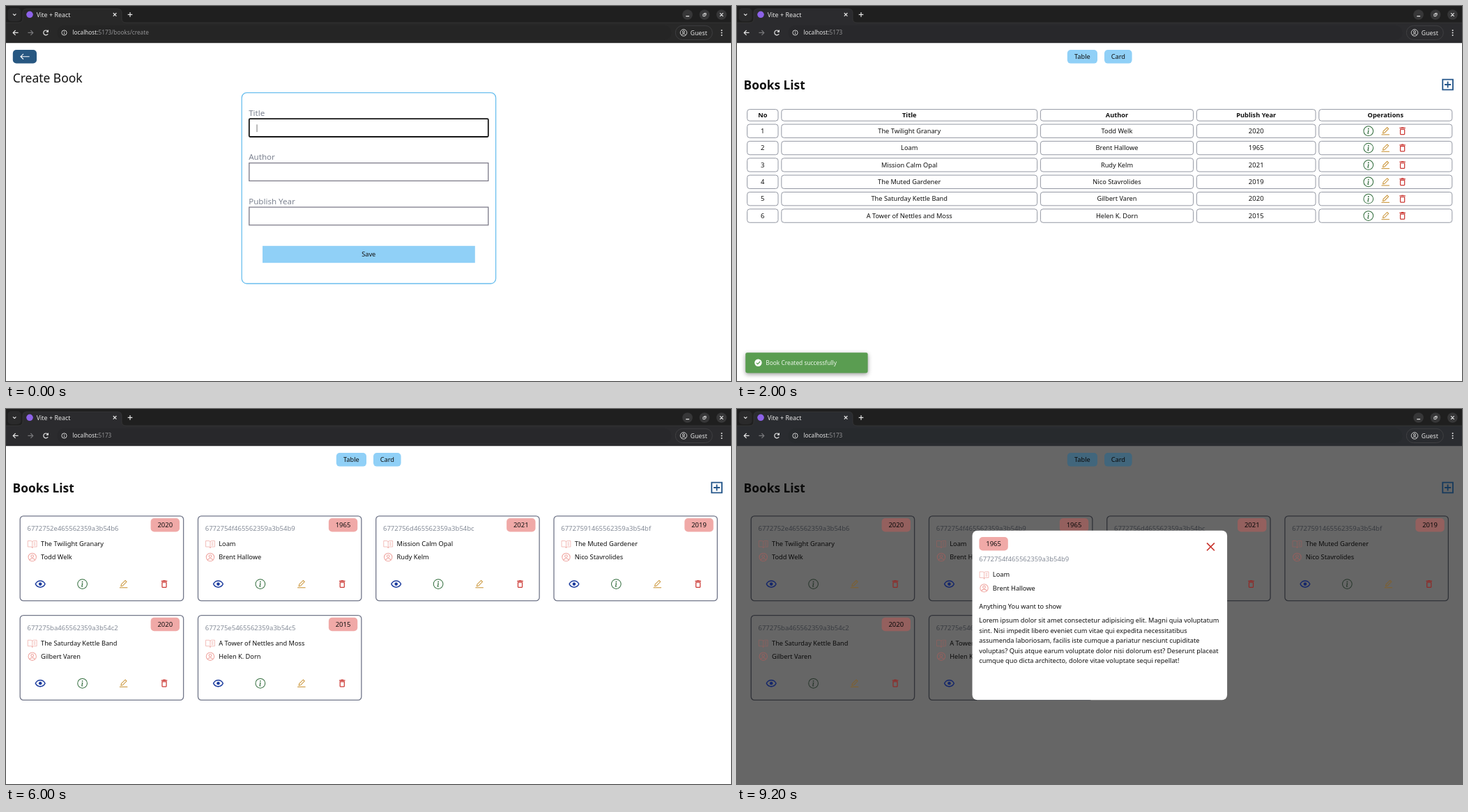
These frames come from a looping animation (1040x539 px, 10 s). An HTML page with a canvas:

```html
<!DOCTYPE html>
<html lang="en">
<head>
<meta charset="utf-8">
<title>Vite + React</title>
<style>
html, body { margin: 0; width: 100%; height: 100%; overflow: hidden; background: #fff; }
canvas { display: block; width: 1040px; height: 539px; }
</style>
</head>
<body>
<canvas id="stage"></canvas>
<script>
const W = 1040, H = 539, SCENE_MS = 2000;
const FONT = '"Noto Sans", "Open Sans", sans-serif';
const BODY = 9.24, DIGITS = 9.5, LABEL = 11.55, HEADING = 17.45;
const canvas = document.getElementById('stage');
const ctx = canvas.getContext('2d');
const ratio = window.devicePixelRatio || 1;
canvas.width = W * ratio;
canvas.height = H * ratio;

const light = {
  page: '#fff', ink: '#111', muted: '#858c98', border: '#72778a', button: '#90d0f7',
  badge: '#f0a9a7', pink: '#efa5a0', add: '#24568a', eye: '#1c3c9e',
  info: '#2f6b3a', edit: '#cb963a', bin: '#cc3934'
};
const dim = {
  page: '#666', ink: '#0a0a0a', muted: '#383b40', border: '#303238', button: '#41667c',
  badge: '#94605e', pink: '#94605e', add: '#173a5c', eye: '#15276b',
  info: '#26352a', edit: '#80602c', bin: '#8f2b28'
};
const sky = '#6bbfee', navy = '#275781', label = '#7d8391';

const books = [
  ['The Twilight Granary', 'Todd Welk', '2020', '6772752e465562359a3b54b6'],
  ['Loam', 'Brent Hallowe', '1965', '6772754f465562359a3b54b9'],
  ['Mission Calm Opal', 'Rudy Kelm', '2021', '6772756d465562359a3b54bc'],
  ['The Muted Gardener', 'Nico Stavrolides', '2019', '67727591465562359a3b54bf'],
  ['The Saturday Kettle Band', 'Gilbert Varen', '2020', '677275ba465562359a3b54c2'],
  ['A Tower of Nettles and Moss', 'Helen K. Dorn', '2015', '677275e5465562359a3b54c5']
];

function text(str, x, y, size = BODY, color = '#111', align = 'left', weight = 400) {
  ctx.font = `${weight} ${size}px ${FONT}`;
  ctx.fillStyle = color;
  ctx.textAlign = align;
  ctx.fillText(str, x, y);
}

function box(x, y, w, h, r, fill, stroke, width = 1) {
  ctx.beginPath();
  ctx.roundRect(x, y, w, h, r);
  if (fill) { ctx.fillStyle = fill; ctx.fill(); }
  if (stroke) { ctx.strokeStyle = stroke; ctx.lineWidth = width; ctx.stroke(); }
}

function disc(x, y, r, color) {
  ctx.beginPath();
  ctx.arc(x, y, r, 0, Math.PI * 2);
  ctx.fillStyle = color;
  ctx.fill();
}

function line(d, color, width = 1) {
  ctx.strokeStyle = color;
  ctx.lineWidth = width;
  ctx.stroke(new Path2D(d));
}

// Icons are drawn in a square grid, centred on (x, y).
function icon(x, y, size, grid, parts, color) {
  ctx.save();
  ctx.translate(x - size / 2, y - size / 2);
  ctx.scale(size / grid, size / grid);
  ctx.fillStyle = color;
  for (const [d, width] of parts) {
    if (width) line(d, color, width);
    else ctx.fill(new Path2D(d), 'evenodd');
  }
  ctx.restore();
}

const shapes = {
  info: [16, [
    ['M15.5 8a7.5 7.5 0 1 1-15 0a7.5 7.5 0 0 1 15 0', 1.1],
    ['M8.93 6.6l-2.29.28-.08.38.45.08c.29.07.35.18.29.47l-.74 3.47c-.2.9.1 1.32.8 1.32.55 0 1.18-.25 1.47-.6l.09-.42c-.2.18-.5.25-.69.25-.27 0-.37-.2-.3-.53zM9 4.5a1 1 0 1 1-2 0a1 1 0 0 1 2 0']]],
  edit: [24, [
    ['M6 17l.8-4.4L16.1 3.6l3.1 3.1-9.2 9.4z', 1.7],
    ['M2.6 20.5h18.8', 1.8]]],
  bin: [24, [['M6 19c0 1.1.9 2 2 2h8c1.1 0 2-.9 2-2V7H6zM8 9h8v10H8zM15.5 4l-1-1h-5l-1 1H5v2h14V4z']]],
  eye: [24, [
    ['M15 12a3 3 0 1 1-6 0a3 3 0 0 1 6 0'],
    ['M12 5c-7.6 0-10 7-10 7s2.2 7 10 7c7.6 0 10-7 10-7s-2.3-7-10-7zm0 12c-5.4 0-7.3-3.8-7.9-5C4.7 10.8 6.6 7 12 7s7.3 3.8 7.9 5c-.6 1.2-2.5 5-7.9 5z']]],
  book: [256, [
    ['M128 88a32 32 0 0 1 32-32h76v144h-76a32 32 0 0 0-32 32V88a32 32 0 0 0-32-32H20v144h76a32 32 0 0 1 32 32', 12],
    ['M160 96h44M160 128h44M160 160h44', 12]]],
  user: [24, [
    ['M21.2 12a9.2 9.2 0 1 1-18.4 0a9.2 9.2 0 0 1 18.4 0', 1.7],
    ['M15 9.7a3 3 0 1 1-6 0a3 3 0 0 1 6 0', 1.7],
    ['M6.3 18.6c.6-2.2 2.1-3.4 4.2-3.4h3c2.1 0 3.6 1.2 4.2 3.4', 1.7]]],
  add: [24, [['M4 4h16v16H4zM12 7v10M7 12h10', 2]]]
};

function draw(name, x, y, size, color) {
  icon(x, y, size, ...shapes[name], color);
}

function browser(path, bar, pill) {
  const white = '#e6e6e6';
  ctx.fillStyle = '#1f1f1f';
  ctx.fillRect(0, 0, W, 24);
  ctx.fillStyle = bar;
  ctx.fillRect(0, 24, W, 29.2);
  ctx.fill(new Path2D('M18 24q6 0 6-6V10q0-6 6-6H160q6 0 6 6v8q0 6 6 6z'));
  line('M0 24H18q6 0 6-6V10q0-6 6-6H160q6 0 6 6v8q0 6 6 6H1040', '#3b3b3c', 0.7);
  box(2.5, 3, 19, 19, 5, '#2a2a2b');
  line('M10 11.3l2.2 2.2 2.2-2.2', white, 1.2);
  disc(34, 12.3, 4.8, '#8d62e8');
  text('Vite + React', 43.7, 15.7, 8.95, white);
  line('M153.8 10l4.6 4.6M158.4 10l-4.6 4.6', white, 1.2);
  line('M174.7 12.4h6.6M178 9.1v6.6', white, 1.2);

  for (const x of [977.6, 1002, 1026.4]) disc(x, 12.5, 7.3, '#373738');
  line('M975.3 14.6h4.8M1024.1 10.2l4.6 4.6M1028.7 10.2l-4.6 4.6', white, 1.1);
  line('M999.9 11.6h3v3h-3zM1001.2 10.4h3v3', white, 0.9);

  line('M17.6 38.4H10.2M13.6 35l-3.4 3.4 3.4 3.4', white, 1.2);
  line('M31.4 38.4H38.8M35.4 35l3.4 3.4-3.4 3.4', '#77777a', 1.2);
  line('M60.2 40a3.4 3.4 0 1 1-.5-3.9M60.4 34.6v2.6h-2.6', white, 1.2);
  box(73.5, 27.8, 881, 21.2, 10.6, pill);
  line('M87.1 38.4a3.6 3.6 0 1 1-7.2 0a3.6 3.6 0 0 1 7.2 0M83.5 37.9v2.5M83.5 36.1v1', white, 0.9);
  text('localhost:', 95.5, 41.4, 8.23, white);
  text('5173' + path, 132.5, 41.4, 8.23, '#929294');
  box(960.3, 28.3, 53, 20.2, 10.1, null, '#454547', 0.8);
  draw('user', 972, 38.4, 12.4, white);
  text('Guest', 981.8, 41.5, 8.73, white);
  for (const y of [34.9, 38.4, 41.9]) disc(1026.6, y, 1, white);
}

function backHeader(title) {
  box(9.8, 63, 34.2, 19.5, 5, navy);
  line('M33.6 72.7H21M25 68.9l-4 3.8 4 3.8', '#fff', 1.1);
  text(title, 9.7, 109.8, HEADING);
}

function button(str, x, w, color, ink) {
  box(x, 63, w, 19.6, 5, color);
  text(str, x + w / 2, 76, BODY, ink, 'center');
}

function listHeader(c) {
  button('Table', 473.8, 43.2, c.button, c.ink);
  button('Card', 527, 39.6, c.button, c.ink);
  text('Books List', 9.5, 119.5, 17.35, c.ink, 'left', 700);
  draw('add', 1019.6, 113, 22, c.add);
}

function badge(year, x, y, c) {
  box(x, y, 41.4, 19.5, 5, c.badge);
  text(year, x + 20.7, y + 13, DIGITS, c.ink, 'center');
}

function bookLines(title, author, x, y, c) {
  draw('book', x, y, 15.2, c.pink);
  draw('user', x, y + 19.2, 14.8, c.pink);
  text(title, x + 12.3, y + 3, BODY, c.ink);
  text(author, x + 12.3, y + 22.5, BODY, c.ink);
}

function createPage() {
  browser('/books/create', '#282828', '#252525');
  backHeader('Create Book');
  box(338.2, 124.7, 364.4, 274.3, 7.2, null, sky, 1.3);
  ['Title', 'Author', 'Publish Year'].forEach((name, i) => {
    const y = 162.2 + i * 63.5;
    text(name, 348.2, y - 4.6, LABEL, label);
    if (i) box(348.8, y, 343, 25.6, 0, null, '#7b7987', 1.3);
    else box(348.8, y, 343, 25.8, 1.4, null, '#151515', 1.8);
  });
  line('M360 170.3v10.8', '#777', 1);
  ctx.fillStyle = light.button;
  ctx.fillRect(368, 344.8, 304.8, 24.4);
  text('Save', 520.2, 360, BODY, '#111', 'center');
}

function tablePage() {
  browser('', '#2b2b2e', '#28282b');
  listHeader(light);
  const cols = [[14.6, 59], [63.8, 430.6], [435.4, 654.6], [659.4, 830], [834.8, 1025.8]];
  const row = (values, y, h, weight) => cols.forEach(([left, right], i) => {
    box(left, y, right - left, h, 3.6, null, '#888d99', 0.9);
    if (values[i] === undefined) return;
    const size = /^\d/.test(values[i]) ? DIGITS : BODY;
    text(values[i], (left + right) / 2, y + h / 2 + 3.2, size, '#111', 'center', weight);
  });
  row(['No', 'Title', 'Author', 'Publish Year', 'Operations'], 148.6, 16.6, 700);
  books.forEach(([title, author, year], i) => {
    const y = 170 + i * 24.37;
    row([String(i + 1), title, author, year], y, 19.4, 400);
    draw('info', 905.8, y + 9.7, 14.6, light.info);
    draw('edit', 930.2, y + 9.7, 14.6, light.edit);
    draw('bin', 954.6, y + 9.7, 14.6, light.bin);
  });
  toast('Book Created successfully');
}

function toast(message) {
  ctx.save();
  ctx.shadowColor = 'rgba(0,0,0,.4)';
  ctx.shadowBlur = 6 * ratio;
  ctx.shadowOffsetY = 2 * ratio;
  box(12.2, 498.2, 175.4, 29.2, 2.4, '#5a9d51');
  ctx.restore();
  disc(30.4, 512.7, 5.2, '#fff');
  line('M27.8 512.8l1.9 1.9 3.5-3.7', '#5a9d51', 1.2);
  text(message, 41.2, 515.8, 8.37, '#eaf4e7');
}

function detailsPage() {
  const [title, author, year, id] = books[2];
  const stamp = 'Mon Dec 30 2024 15:56:53 GMT+0530 (India Standard Time)';
  browser('/books/details/' + id, '#282828', '#252525');
  backHeader('Show Book');
  box(10.3, 124.7, 388, 240, 7.2, null, sky, 1.3);
  const rows = [
    ['Id', id, 40.7, DIGITS], ['Title', title, 55, BODY], ['Author', author, 68.8, BODY],
    ['Publish Year', year, 97.2, DIGITS], ['Create Time', stamp, 97, 9.35],
    ['Last Update Time', stamp, 126.2, 9.35]
  ];
  rows.forEach(([name, value, x, size], i) => {
    const y = 157.8 + i * 36.6;
    text(name, 20.7, y, LABEL, label);
    text(value, x, y, size);
  });
}

function cards(c) {
  listHeader(c);
  books.forEach(([title, author, year, id], i) => {
    ctx.save();
    ctx.translate((i % 4) * 255.25, Math.floor(i / 4) * 142.7);
    box(20.2, 153.9, 234.4, 121.8, 4.8, null, c.border, 1.3);
    badge(year, 207.6, 157, c);
    text(id, 30.5, 174.8, DIGITS, c.muted);
    bookLines(title, author, 37.7, 193.8, c);
    draw('eye', 49.2, 251.6, 18.3, c.eye);
    draw('info', 109.6, 251.6, 14.6, c.info);
    draw('edit', 168.6, 251.6, 14.6, c.edit);
    draw('bin', 227, 251.6, 14.6, c.bin);
    ctx.restore();
  });
}

function cardsPage() {
  browser('', '#2b2b2e', '#28282b');
  cards(light);
}

function modalPage() {
  const [title, author, year, id] = books[1];
  const lines = [
    'Lorem ipsum dolor sit amet consectetur adipisicing elit. Magni quia voluptatum',
    'sint. Nisi impedit libero eveniet cum vitae qui expedita necessitatibus',
    'assumenda laboriosam, facilis iste cumque a pariatur nesciunt cupiditate',
    'voluptas? Quis atque earum voluptate dolor nisi dolorum est? Deserunt placeat',
    'cumque quo dicta architecto, dolore vitae voluptate sequi repellat!'
  ];
  ctx.fillStyle = dim.page;
  ctx.fillRect(0, 0, W, H);
  browser('', '#2a2c30', '#272a2d');
  cards(dim);
  box(337.5, 174.7, 365.6, 243.6, 7.3, '#fff');
  badge(year, 347.4, 184, light);
  line('M674.1 192.7l10.8 10.8M684.9 192.7l-10.8 10.8', '#c9362f', 1.7);
  text(id, 347.3, 219.4, DIGITS, light.muted);
  bookLines(title, author, 354.5, 238.2, light);
  text('Anything You want to show', 347.3, 287.4);
  lines.forEach((str, i) => text(str, 347.3, 306.9 + i * 14.62));
}

const scenes = [createPage, tablePage, detailsPage, cardsPage, modalPage];
const start = performance.now();

function render(now) {
  const t = Math.max(0, now - start) % (SCENE_MS * scenes.length);
  ctx.setTransform(ratio, 0, 0, ratio, 0, 0);
  ctx.fillStyle = '#fff';
  ctx.fillRect(0, 0, W, H);
  scenes[Math.floor(t / SCENE_MS)]();
  requestAnimationFrame(render);
}
render(start);
</script>
</body>
</html>
```
